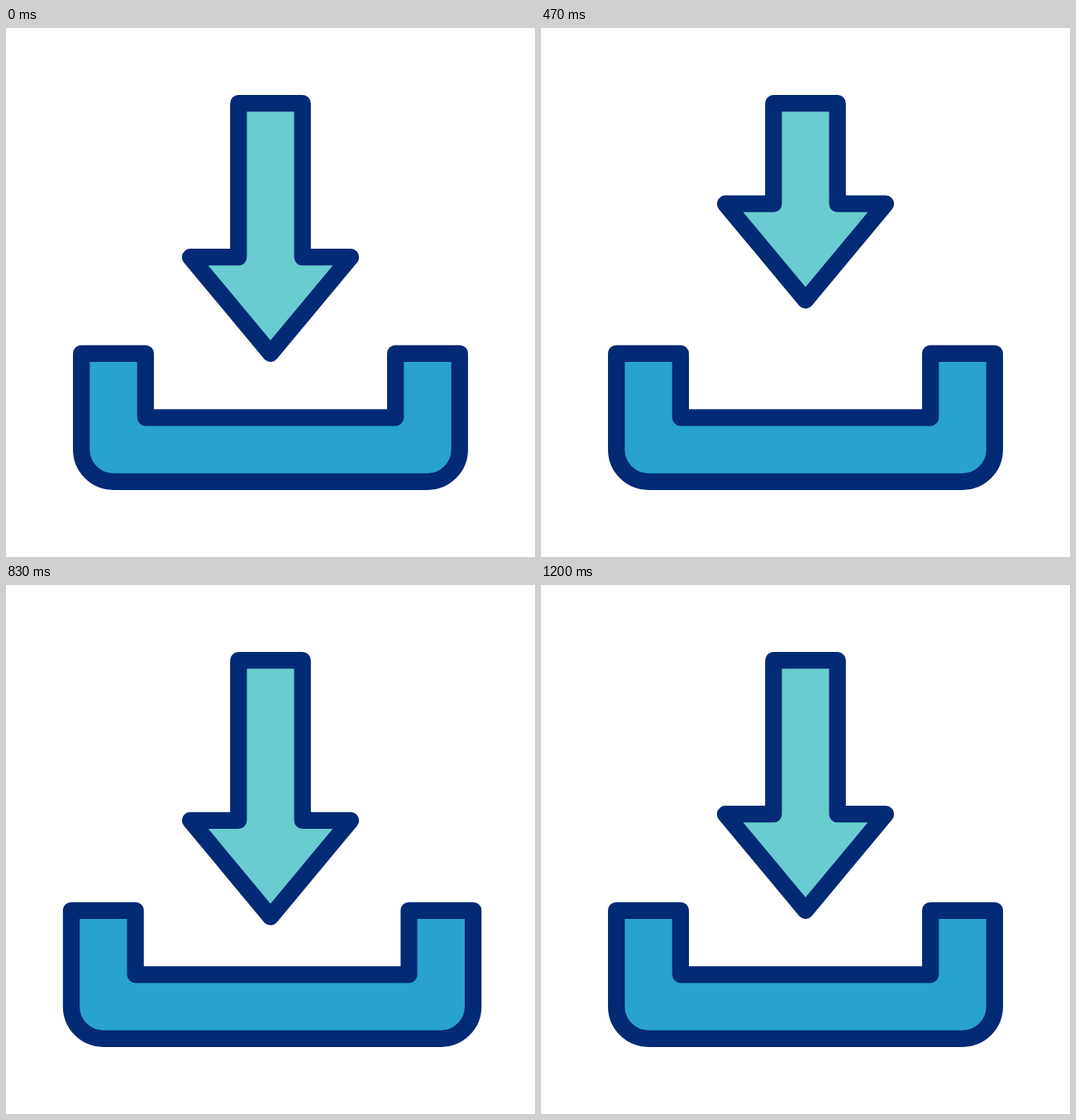
These frames come from a looping animation (640 px wide and 640 px high, 1.5 s). An HTML page:

```html
<!DOCTYPE html>
<html lang="en">
<head>
<meta charset="utf-8">
<title>Download</title>
<style>
  html, body { margin: 0; width: 100%; height: 100%; overflow: hidden; background: #fff; }
  svg { display: block; width: 100%; height: 100%; }
  path { stroke: #032a75; stroke-width: 20.3; stroke-linejoin: round; }
</style>
</head>
<body>
<svg viewBox="0 0 640 640">
  <path id="tray" fill="#29a2ce"/>
  <path id="arrow" fill="#69ccd0"/>
</svg>
<script>
const LOOP = 1500, FPS = 30, LAST = 36;
const tray = document.getElementById('tray');
const arrow = document.getElementById('arrow');

const smooth = u => u * u * (3 - 2 * u);
const quickRise = u => 1 - (1 - smooth(u)) ** 2.9;

// [step, value, easing towards this key]
const drop = [[0, 0], [14, -64.5, quickRise], [21, 73.3], [28, -35], [35, 0]];
const stretch = [[14, 0], [21, 1], [28, 0]];

function valueAt(keys, k) {
  if (k <= keys[0][0]) return keys[0][1];
  for (let i = 1; i < keys.length; i++) {
    const [k0, a] = keys[i - 1];
    const [k1, b, ease = smooth] = keys[i];
    if (k <= k1) return a + (b - a) * ease((k - k0) / (k1 - k0));
  }
  return keys[keys.length - 1][1];
}

function arrowPath(dy) {
  const y = 277.2 + dy;
  return `M281.3 91.2H358.7V${y}H417L320 ${y + 116.6}L223 ${y}H281.3Z`;
}

function trayPath(s) {
  const l = 91.2 - 31 * s, r = 548.8 + 41.5 * s;
  return `M${l} 393.8h77.6v77.5H${r - 77.6}v-77.5H${r}V510` +
    `a38.8 38.8 0 0 1 -38.8 38.8H${l + 38.8}a38.8 38.8 0 0 1 -38.8 -38.8Z`;
}

function draw(now) {
  const t = now % LOOP;
  const k = Math.min(LAST, Math.floor((t + 4) * FPS / 1000));
  arrow.setAttribute('d', arrowPath(valueAt(drop, k)));
  tray.setAttribute('d', trayPath(valueAt(stretch, k)));
}

let start;
function tick(now) {
  start ??= now;
  draw(now - start);
  requestAnimationFrame(tick);
}
draw(0);
requestAnimationFrame(tick);
</script>
</body>
</html>
```
